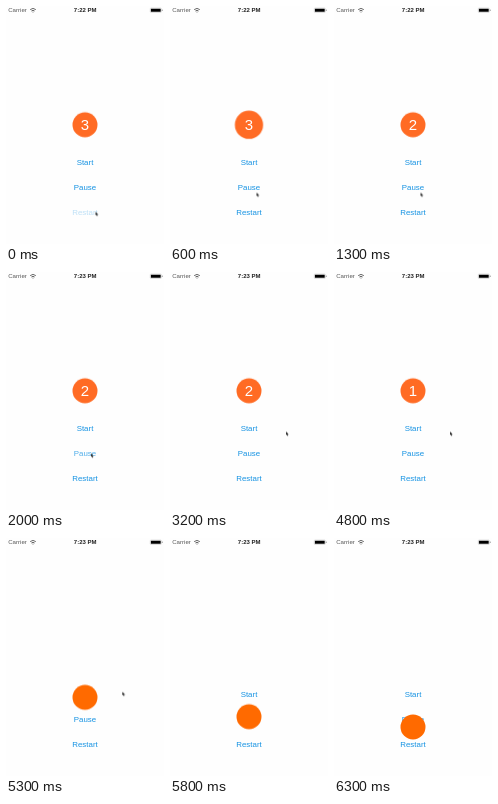
Write an HTML page that moves like this. It is 158 by 238 pixels and loops after 6400 ms.

```html
<!DOCTYPE html>
<html lang="en">
<head>
<meta charset="utf-8">
<title>Countdown</title>
<style>
  html, body { margin: 0; width: 100%; height: 100%; overflow: hidden; background: #fefefe; }
  svg { display: block; width: 100%; height: 100%; }
  text { font-family: "Liberation Sans", Arial, sans-serif; text-anchor: middle; }

  .anim { animation: 6400ms linear infinite; }
  .status { font-size: 6.1px; fill: #555; }
  .clock { font-size: 6px; font-weight: bold; fill: #222; }
  .button { font-size: 7.9px; fill: #1592e2; }
  .digit { font-size: 15px; fill: #fff; }

  .hard { animation-timing-function: step-end; }
  .early { animation-name: early; }
  .late { animation-name: late; }
  @keyframes early { 0% { opacity: 1 } 26.56%, 100% { opacity: 0 } }
  @keyframes late { 0% { opacity: 0 } 26.56%, 100% { opacity: 1 } }

  .three { animation-name: three; }
  .two { animation-name: two; }
  .one { animation-name: one; }
  @keyframes three { 0% { opacity: 1 } 20.3125%, 100% { opacity: 0 } }
  @keyframes two { 0% { opacity: 0 } 20.3125% { opacity: 1 } 60.9375%, 100% { opacity: 0 } }
  @keyframes one { 0% { opacity: 0 } 60.9375% { opacity: 1 } 76.5625%, 100% { opacity: 0 } }

  /* One pop on every tick: rest, big, small, big, rest */
  .pop { animation-name: pop; animation-timing-function: ease-in-out; }
  @keyframes pop {
    0%, 4.6875%, 10.9375%, 20.3125%, 26.5625%, 60.9375%, 67.1875%, 76.5625%, 82.8125%, 100% { transform: scale(1) }
    6.25%, 21.875%, 62.5%, 78.125% { transform: scale(1.17) }
    7.8125%, 23.4375%, 64.0625%, 79.6875% { transform: scale(.73) }
    9.375%, 25%, 65.625%, 81.25% { transform: scale(1.13) }
  }

  /* Gravity, then a bounce off the bottom edge */
  .fall { animation-name: fall; }
  @keyframes fall {
    0% { transform: translateY(0) }
    76.5625% { transform: translateY(0); animation-timing-function: cubic-bezier(.3333, 0, .6667, .3333) }
    86.72% { transform: translateY(106.5px); animation-timing-function: cubic-bezier(.3333, .6667, .6667, 1) }
    94.06% { transform: translateY(47px); animation-timing-function: cubic-bezier(.3333, 0, .6667, .3333) }
    100% { transform: translateY(89.4px) }
  }

  .ball { fill: #ff6b24; animation-name: ball; }
  @keyframes ball { 0% { fill: #ff6b24 } 76.5625%, 100% { fill: #ff6a00 } }

  .restart { animation-name: restart; }
  .pause { animation-name: pause; }
  .start { animation-name: start; }
  @keyframes restart { 0%, 1% { opacity: .28 } 5.5%, 100% { opacity: 1 } }
  @keyframes pause { 0%, 29.5% { opacity: 1 } 30%, 31.3% { opacity: .75 } 35%, 100% { opacity: 1 } }
  @keyframes start { 0%, 43% { opacity: 1 } 43.8%, 45% { opacity: .4 } 49%, 100% { opacity: 1 } }

  .cursor { animation-name: cursor; animation-timing-function: ease-in-out; }
  @keyframes cursor {
    0%, 3% { transform: translate(89.5px, 205.8px); opacity: 1 }
    9.375%, 20% { transform: translate(86.5px, 186.6px) }
    28%, 36% { transform: translate(85px, 181.4px) }
    42%, 45.5% { transform: translate(82px, 158px) }
    50%, 81.25% { transform: translate(116px, 159.6px) }
    82.8% { transform: translate(116.3px, 153.8px) }
    89% { transform: translate(86px, 204px); opacity: 1 }
    89.1%, 100% { transform: translate(86px, 204px); opacity: 0 }
  }
</style>
</head>
<body>
<svg viewBox="0 0 158 238">
  <text class="status" x="11.5" y="6.4">Carrier</text>
  <g fill="none" stroke="#555" stroke-width=".9">
    <path d="M24.2 3.6Q27 1.2 29.8 3.6M25.4 5Q27 3.6 28.6 5"/>
    <circle cx="27" cy="6" r=".5" fill="#555" stroke="none"/>
  </g>
  <g class="clock">
    <text class="anim hard early" x="79.2" y="6.4">7:22 PM</text>
    <text class="anim hard late" x="79.2" y="6.4">7:23 PM</text>
  </g>
  <rect x="144.3" y="2.1" width="11" height="4.3" rx=".7" fill="#fefefe" stroke="#aaa" stroke-width=".4"/>
  <rect x="144.9" y="2.7" width="9.8" height="3.1" rx=".3"/>
  <rect x="155.8" y="3.4" width=".8" height="1.7" rx=".3" fill="#888"/>

  <g class="button">
    <text class="anim start" x="79" y="159.3">Start</text>
    <text class="anim pause" x="79" y="184.3">Pause</text>
    <text class="anim restart" x="79" y="209.3">Restart</text>
  </g>

  <g class="anim fall">
    <g transform="translate(79 118.8)">
      <g class="anim pop"><circle class="anim hard ball" r="12.5"/></g>
      <g class="digit">
        <text class="anim hard three" y="5.4">3</text>
        <text class="anim hard two" y="5.4">2</text>
        <text class="anim hard one" y="5.4">1</text>
      </g>
    </g>
  </g>

  <path class="anim cursor" d="M0 0V3.6L.9 2.9 1.6 4.4 2.3 4.1 1.6 2.6H2.7Z" fill="#333"/>
</svg>
</body>
</html>
```
